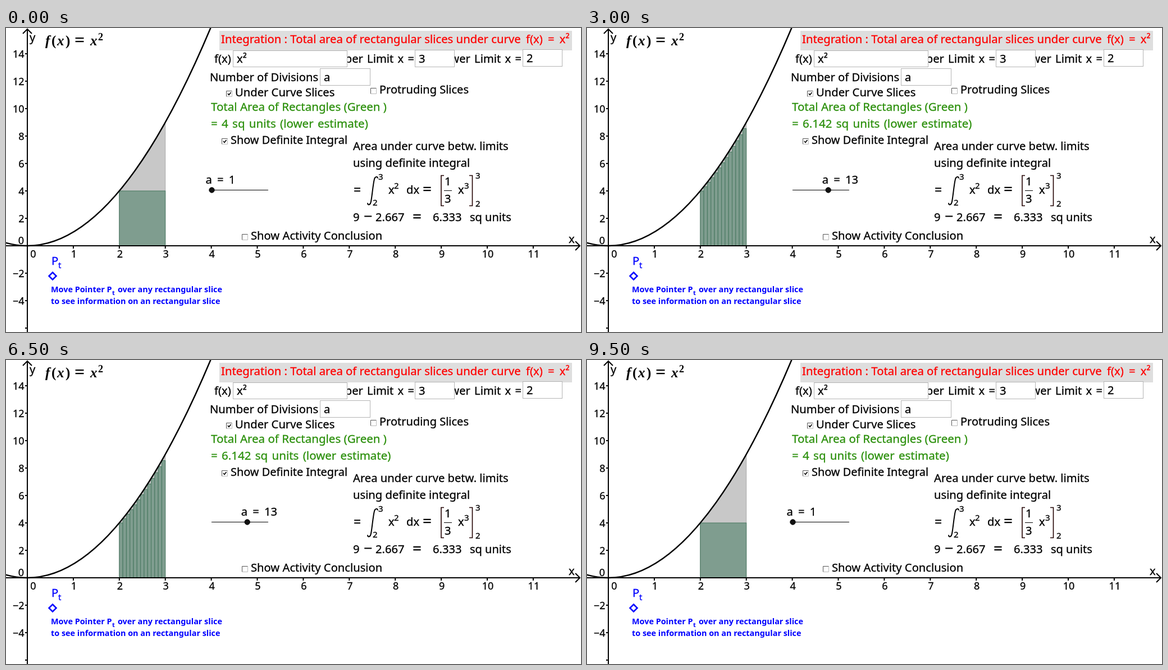
Recreate the animation shown at these times as an HTML page. Size 1024 px wide and 543 px high, loop 9.75 s.

```html
<!DOCTYPE html>
<html lang="en">
<head>
<meta charset="utf-8">
<title>Integration by slices</title>
<style>
  html, body { margin: 0; width: 100%; height: 100%; overflow: hidden; background: #fff; }
  svg { display: block; color: #000; font: 20.2px "Noto Sans", "Open Sans", sans-serif; }
  text { fill: currentColor; stroke: currentColor; stroke-width: .3; }
  .axis { stroke: #000; stroke-width: 2; fill: none; }
  .num { font-size: 18px; }
  .small { font-size: 15px; }
  .end { text-anchor: end; }
  .mid { text-anchor: middle; }
  .red { color: #f00; }
  .blue { color: #00f; }
  .hint { color: #00f; font-weight: bold; font-size: 14.4px; stroke: none; }
  .green { color: #2a8f0a; font-size: 20.5px; }
  .wide { word-spacing: 2px; }
  .wider { word-spacing: 4px; }
  .formula { font: bold 25px "Liberation Serif", serif; }
  .formula text { stroke: none; }
  .formula .it { font-style: italic; }
  .field { fill: #fff; stroke: #b4b4b4; }
  .bracket { fill: none; stroke: #200; stroke-width: 1.6; }
  #slices rect { fill: #7f9d8f; stroke: #47775f; stroke-width: 1; }
</style>
</head>
<body>
<svg width="1024" height="543" viewBox="0 0 1024 543">
  <path id="area" fill="#c8c8c8" stroke="#9a9a9a" stroke-width=".8"/>
  <g id="slices"></g>
  <path class="axis" d="M0 389H1022M1014 381L1022 389L1014 397M38 543V2M30 10L38 2L46 10"/>
  <g id="ticks"></g>
  <path id="curve" fill="none" stroke="#000" stroke-width="2.5"/>
  <text x="42" y="24">y</text>
  <text x="1002" y="384">x</text>

  <g class="formula">
    <text class="it" x="70" y="31">f</text><text x="81" y="31">(</text>
    <text class="it" x="91" y="31">x</text><text x="106" y="31">)</text>
    <text x="122" y="32" font-size="32">=</text>
    <text class="it" x="150" y="31">x</text><text x="164" y="22" font-size="18">2</text>
  </g>

  <rect x="380" y="5" width="628" height="35" fill="#dedede"/>
  <text class="red" x="383" y="27" font-size="20.3">Integration : Total area of rectangular slices under curve</text>
  <text class="red wider" x="926" y="27">f(x) = x²</text>

  <text x="371" y="62">f(x)</text>
  <text class="end wide" x="727" y="62">Upper Limit x =</text>
  <text class="end wide" x="918" y="62">Lower Limit x =</text>
  <text x="363" y="95">Number of Divisions</text>
  <rect class="field" x="404.5" y="40.5" width="203" height="29"/>
  <rect class="field" x="728.5" y="39.5" width="70" height="30"/>
  <rect class="field" x="920.5" y="38.5" width="70" height="30"/>
  <rect class="field" x="559.5" y="72.5" width="89" height="30"/>
  <text x="411" y="62">x²</text>
  <text x="735" y="62">3</text>
  <text x="927" y="61">2</text>
  <text x="566" y="95">a</text>

  <g id="boxes"></g>
  <text x="408" y="122">Under Curve Slices</text>
  <text x="665" y="117" font-size="20">Protruding Slices</text>
  <text x="400" y="207" font-size="19.9">Show Definite Integral</text>
  <text x="436" y="378">Show Activity Conclusion</text>

  <text class="green" x="365" y="148">Total Area of Rectangles (Green )</text>
  <text class="green wide" x="365" y="178" id="total"></text>

  <path d="M366 289.5H467" stroke="#000"/>
  <g id="slider">
    <circle cy="289.5" r="4.7" fill="#111" stroke="#000"/>
    <text class="wider" x="-11" y="278" id="label"></text>
  </g>

  <text x="618" y="218">Area under curve betw. limits</text>
  <text x="618" y="248">using definite integral</text>
  <text x="619" y="297" font-size="23">=</text>
  <path d="M662 268.5C662 265 657.5 264.5 656 270C653.5 280 652 300 650 310C648.5 317 644 317 644 312.5" fill="none" stroke="#000" stroke-width="2"/>
  <text class="small" x="663" y="271">3</text>
  <text class="small" x="653" y="317">2</text>
  <text x="681" y="296">x</text><text class="small" x="691" y="287">2</text>
  <text x="713" y="296">dx</text>
  <text x="742" y="297" font-size="28">=</text>
  <path class="bracket" d="M780 263.5H775V317.5H780M825 263.5H830.5V317.5H825"/>
  <text x="781" y="281">1</text>
  <path d="M780 290.5H794" stroke="#000"/>
  <text x="781" y="312">3</text>
  <text x="805" y="296">x</text><text class="small" x="816" y="287">3</text>
  <text class="small" x="836" y="269">3</text>
  <text class="small" x="836" y="319">2</text>
  <text x="618" y="345">9</text>
  <text x="637" y="346" font-size="27">−</text>
  <text x="658" y="345">2.667</text>
  <text x="724" y="346" font-size="28">=</text>
  <text x="760" y="345">6.333</text>
  <text x="826" y="345" font-size="20">sq units</text>

  <text class="blue" x="81" y="423">P</text>
  <text class="blue small" x="93" y="429">t</text>
  <path d="M83 436.5L89.5 443L83 449.5L76.5 443Z" fill="#fff" stroke="#00f" stroke-width="2.5"/>
  <text class="hint" x="80" y="472">Move Pointer P</text>
  <text class="hint" x="189" y="477" style="font-size:11px">t</text>
  <text class="hint" x="199" y="472">over any rectangular slice</text>
  <text class="hint" x="80" y="493">to see information on an rectangular slice</text>
</svg>
<script>
const $ = id => document.getElementById(id);
const UNIT_X = 81.9, UNIT_Y = 24.5;
const px = x => 38 + UNIT_X * x;
const py = y => 389 - UNIT_Y * y;
const STEP = 250, FRAMES = 39, MAX = 20;

// A parabola section is exactly one quadratic Bézier.
const parabola = (a, b) =>
  `M${px(a)} ${py(a * a)}Q${px((a + b) / 2)} ${py(a * b)} ${px(b)} ${py(b * b)}`;
$('curve').setAttribute('d', parabola(-0.6, 4.1));
$('area').setAttribute('d', `${parabola(2, 3)}V${py(0)}H${px(2)}Z`);

let ticks = '<text class="num end" x="32" y="386">0</text><text class="num mid" x="48.5" y="410">0</text>';
for (let x = 1; x <= 11; x++)
  ticks += `<path class="axis" d="M${px(x)} 389v5"/><text class="num mid" x="${px(x) + 1}" y="410">${x}</text>`;
for (let y = -6; y <= 14; y += 2) {
  if (!y) continue;
  ticks += `<path class="axis" d="M34 ${py(y)}h4"/>`;
  if (y > -6) ticks += `<text class="num end" x="32.5" y="${py(y) + 6.5}">${String(y).replace('-', '−')}</text>`;
}
$('ticks').innerHTML = ticks;

const box = (x, y, on) => `<g transform="translate(${x} ${y})" fill="none">
  <path d="M0 10V0H10" stroke="#555"/><path d="M0 10H10V0" stroke="#bbb"/>
  ${on ? '<path d="M2.5 4.5L4.5 7L8 2.5" stroke="#000" stroke-width="1.6"/>' : ''}</g>`;
$('boxes').innerHTML = box(392.5, 112.5, true) + box(649.5, 107.5, false) +
  box(384.5, 197.5, true) + box(420.5, 368.5, false);

let shown = 0;
function show(n) {
  let sum = 0, rects = '';
  for (let i = 0; i < n; i++) {
    const x = 2 + i / n, h = x * x;
    sum += h / n;
    rects += `<rect x="${px(x)}" y="${py(h)}" width="${UNIT_X / n}" height="${UNIT_Y * h}"/>`;
  }
  $('slices').innerHTML = rects;
  $('total').textContent = `= ${+sum.toFixed(3)} sq units (lower estimate)`;
  $('label').textContent = `a = ${n}`;
  $('slider').setAttribute('transform', `translate(${366.5 + (n - 1) * 100 / (MAX - 1)} 0)`);
  shown = n;
}

let start;
function tick(now) {
  start ??= now;
  const i = Math.floor((now - start) / STEP) % FRAMES;
  const n = i < MAX ? i + 1 : FRAMES - i;
  if (n !== shown) show(n);
  requestAnimationFrame(tick);
}
show(1);
requestAnimationFrame(tick);
</script>
</body>
</html>
```
